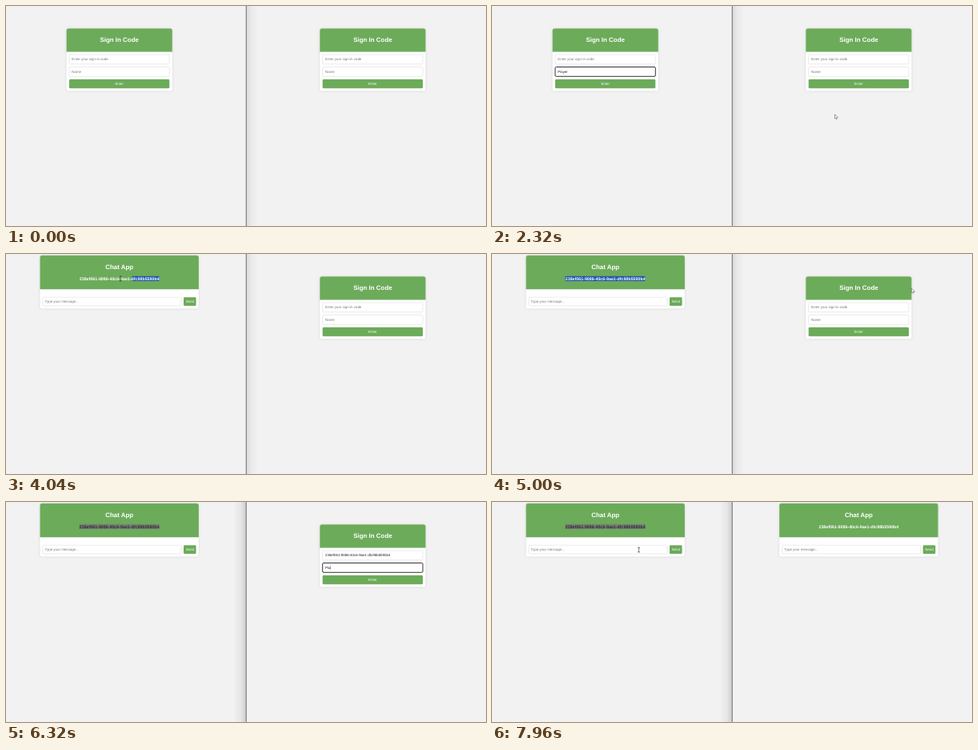
Recreate the animation shown at these times as an HTML page. Size 600x276 px, loop 8 s.

```html
<!DOCTYPE html>
<html lang="en">
<head>
<meta charset="utf-8">
<title>Chat sign-in</title>
<style>
  html, body { margin: 0; width: 100%; height: 100%; overflow: hidden; background: #f2f2f2; }
  svg { display: block; width: 100vw; height: 100vh; }
  text { font: 4.41px "Liberation Sans", Arial, sans-serif; text-rendering: geometricPrecision; white-space: pre; }
  .title { font-size: 7.95px; font-weight: bold; fill: #fff; text-anchor: middle; }
  .code { font-size: 5.3px; font-weight: bold; fill: #fff; text-anchor: middle; }
  .label { fill: #fff; text-anchor: middle; }
  .hint { fill: #757575; }
  .value { fill: #222; }
  .label, .hint, .value, .caret, #pointer { pointer-events: none; }
  .header, .button { fill: #6cab5a; }
  .card { fill: #fff; filter: drop-shadow(0 0 1.5px rgba(0, 0, 0, .12)); }
  .field { fill: #fff; stroke: #ccc; stroke-width: .4; }
  .focus .field { stroke: #1c1c1c; stroke-width: .9; }
  .caret { fill: #222; }
</style>
</head>
<body>
<svg viewBox="0 0 600 276" preserveAspectRatio="none">
  <defs>
    <linearGradient id="fade">
      <stop offset="0" stop-color="#000" stop-opacity=".2"/>
      <stop offset=".4" stop-color="#000" stop-opacity=".07"/>
      <stop offset="1" stop-color="#000" stop-opacity="0"/>
    </linearGradient>
  </defs>
  <rect width="600" height="276" fill="#f2f2f2"/>
  <rect id="shade" width="16" height="276" fill="url(#fade)"/>
  <rect x="299.8" width=".8" height="276" fill="#505050"/>
  <g id="panes"></g>
  <g id="pointer" stroke-linejoin="round" stroke-linecap="round">
    <path id="arrow" d="M0 0V5L1.2 4L2 5.8L2.8 5.4L2 3.7H3.6Z" fill="#fff" stroke="#444" stroke-width=".5"/>
    <path id="beam" d="M-1.1 -2.8H1.1M0 -2.8V2.8M-1.1 2.8H1.1" fill="none" stroke="#333" stroke-width=".6"/>
    <path id="hand" d="M-.6 0Q0 -.7 .5 0V2L2.5 2.4Q3.1 2.6 3 3.4L2.5 5.4H-.6L-2 3.2Q-1.6 2.5 -.6 3.2Z" fill="#fff" stroke="#444" stroke-width=".35"/>
  </g>
</svg>
<script>
const LOOP = 8000, STEP = 40, BLINK = 480, KEY = 120;
const GAP = 316.7, MID = 141.7, SIGN_W = 132.2, CHAT_W = 198.4, TEXT_X = 82.3;
const CODE = "238ef061-9086-40c6-9ae1-dfc98b5590b4";

// Clicks and other turning points, in ms
const LEFT_FOCUS = 560, LEFT_TYPE = 1240, LEFT_ENTER = 3160, LEFT_CHAT = 3240;
const DRAG = 3840, DRAG_END = 4250, RIGHT_CLICK = 5160, PASTE = 5400;
const RIGHT_FOCUS = 5760, RIGHT_TYPE = 6040, RIGHT_ENTER = 7280, RIGHT_CHAT = 7360;

const $ = id => document.getElementById(id);
const show = (id, on) => $(id).style.display = on ? "" : "none";
const clamp = (v, lo, hi) => Math.min(hi, Math.max(lo, v));

const rect = (x, y, w, h, r, cls, id = "") =>
  `<rect x="${x}" y="${y}" width="${w}" height="${h}" rx="${r}" class="${cls}" id="${id}"/>`;
const text = (x, y, cls, s, id = "") => `<text x="${x}" y="${y}" class="${cls}" id="${id}">${s}</text>`;

const card = (y, w, h, head) => {
  const x = MID - w / 2;
  return rect(x, y, w, h, 2.7, "card") +
    `<path class="header" d="M${x} ${y + head}v${2.7 - head}q0 -2.7 2.7 -2.7h${w - 5.4}q2.7 0 2.7 2.7v${head - 2.7}z"/>`;
};
const button = (x, y, w, h, s) =>
  rect(x, y, w, h, 1.3, "button") + text(x + w / 2, y + h / 2 + 1.4, "label", s);
const field = (id, y, hint) => `<g id="${id}">` +
  rect(79, y, 125.3, 11.8, 1.3, "field") +
  text(TEXT_X, y + 7.3, "hint", hint, id + "Hint") +
  text(TEXT_X, y + 7.3, "value", "", id + "Value") +
  rect(0, y + 3.4, .35, 5, 0, "caret", id + "Caret") + "</g>";

const pane = (p, dx) => `<g transform="translate(${dx} 0)">
  <g id="${p}Sign">` +
    card(28.3, SIGN_W, 78.3, 29.1) + text(MID, 45.4, "title", "Sign In Code") +
    field(p + "Code", 61, "Enter your sign-in code") + field(p + "Name", 76.5, "Name") +
    button(79, 92, 125.3, 11.3, "Enter") +
  `</g><g id="${p}Chat">` +
    card(1.8, CHAT_W, 66.6, 42.4) + text(MID, 18.9, "title", "Chat App") +
    rect(0, 27.8, 0, 6.2, 0, "", p + "Mark") + text(MID, 32.6, "code", CODE, p + "Key") +
    rect(46, 54.2, 173, 10.8, 1.3, "field") + text(48.6, 61.1, "hint", "Type your message...") +
    button(222, 54.2, 15.6, 10.8, "Send") +
  `</g></g>`;

$("panes").innerHTML = pane("l", 0) + pane("r", GAP);

// Pointer moves, each eased from the place before: start, end, x, y
const START = [330, 240];
const moves = [
  [40, 400, 150, 83],
  [LEFT_FOCUS, 800, 428.5, 136.3],
  [2520, 2880, 185, 96],
  [3560, DRAG, 191.5, 31],
  [DRAG, DRAG_END, 91.5, 31],
  [4800, 5026, 541, 44],
  [5026, RIGHT_CLICK, 455, 67],
  [5440, 5600, 411, 82],
  [7000, 7120, 423, 95.5],
  [7440, 7920, 183.6, 60]
];

function pointAt(t) {
  return moves.reduce(([x, y], [from, to, tx, ty]) => {
    const u = clamp((t - from) / (to - from), 0, 1), e = u * u * (3 - 2 * u);
    return [x + (tx - x) * e, y + (ty - y) * e];
  }, START);
}

function kindAt(x, y) {
  const el = document.elementFromPoint(x * innerWidth / 600, y * innerHeight / 276);
  const cls = el ? el.getAttribute("class") : "";
  return cls === "button" ? "hand" : cls === "field" || cls === "code" ? "beam" : "arrow";
}

const typed = (s, start, t) => s.slice(0, clamp(Math.floor((t - start) / KEY) + 1, 0, s.length));

function setField(id, value, from, to, t, keyTime = from) {
  const v = $(id + "Value"), focused = t >= from && t < to;
  v.textContent = value;
  show(id + "Hint", !value);
  $(id).setAttribute("class", focused ? "focus" : "");
  show(id + "Caret", focused && Math.floor((t - keyTime) / BLINK) % 2 === 0);
  $(id + "Caret").setAttribute("x", TEXT_X + .2 + (value ? v.getComputedTextLength() : 0));
}

function setName(id, name, from, start, to, t) {
  const s = typed(name, start, t);
  setField(id, s, from, to, t, s ? start + (s.length - 1) * KEY : from);
}

function draw(t) {
  const chat = { l: t >= LEFT_CHAT, r: t >= RIGHT_CHAT }, rightActive = t >= RIGHT_CLICK;
  for (const p in chat) {
    show(p + "Sign", !chat[p]);
    show(p + "Chat", chat[p]);
  }
  $("shade").setAttribute("transform", `translate(300.2 0) scale(${rightActive ? -1 : 1} 1)`);
  $("shade").setAttribute("opacity", rightActive ? .75 : .5);

  setField("lCode", "", LOOP, LOOP, t);
  setName("lName", "Player", LEFT_FOCUS, LEFT_TYPE, LEFT_ENTER, t);
  setField("rCode", t >= PASTE ? CODE : "", RIGHT_CLICK, RIGHT_FOCUS, t);
  setName("rName", "Player2", RIGHT_FOCUS, RIGHT_TYPE, RIGHT_ENTER, t);

  // The selection trails the drag by one step
  const edge = pointAt(clamp(t - STEP, DRAG, DRAG_END))[0];
  $("lMark").setAttribute("x", edge);
  $("lMark").setAttribute("width", 191.5 - edge);
  $("lMark").style.fill = rightActive ? "#757d74" : "#1f55b0";
  $("lKey").style.fill = rightActive ? "#303030" : "#fff";

  const [x, y] = pointAt(t), kind = kindAt(x, y);
  show("pointer", t >= 40 && (t < RIGHT_TYPE || t >= 7040));
  $("pointer").setAttribute("transform", `translate(${x} ${y})`);
  for (const k of ["arrow", "beam", "hand"]) show(k, k === kind);
}

const start = performance.now();
function tick() {
  const t = (performance.now() - start) % LOOP;
  draw(Math.floor(t / STEP) * STEP);
  requestAnimationFrame(tick);
}
tick();
</script>
</body>
</html>
```
